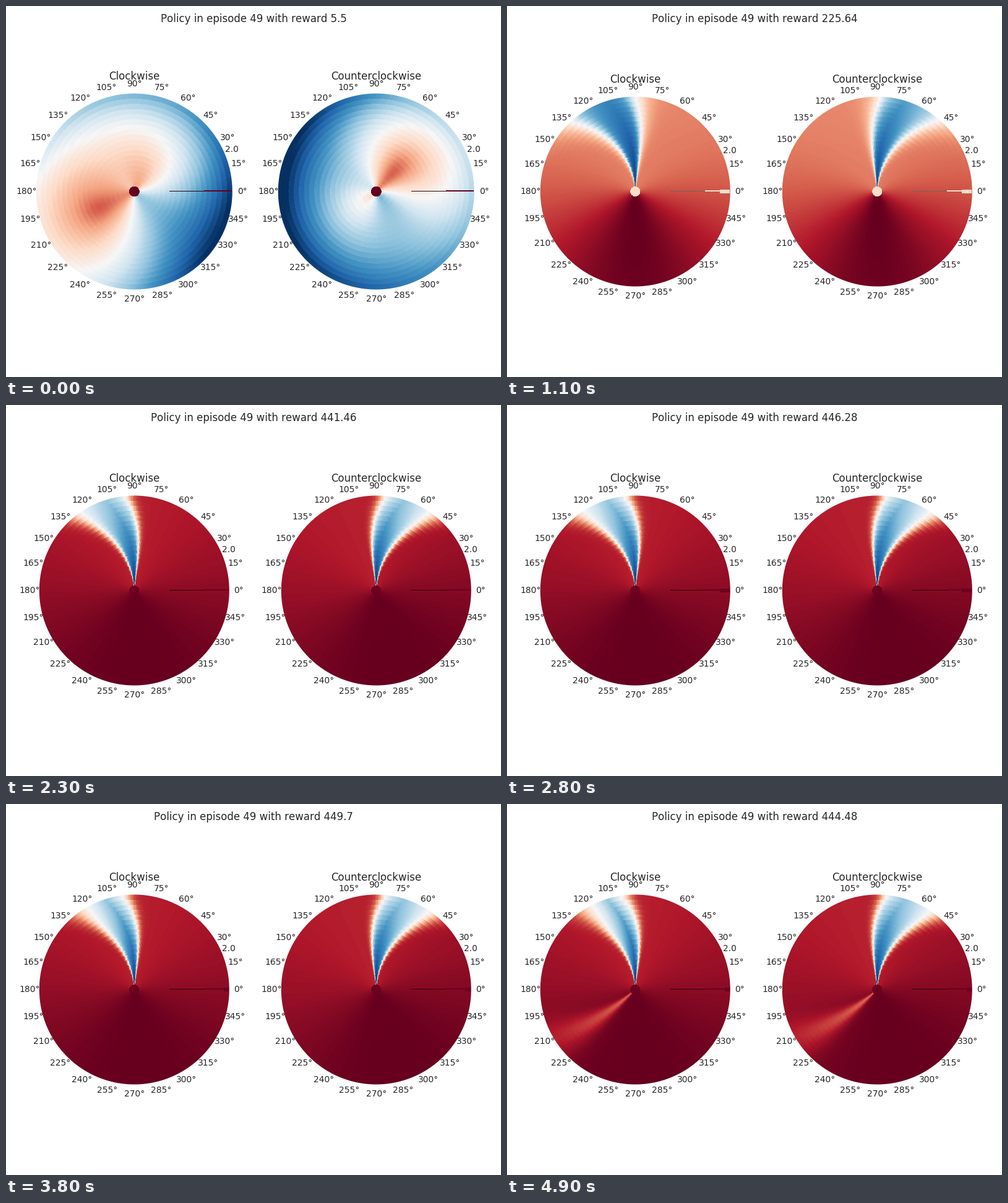
A matplotlib script that plays this animation: 800 px wide and 600 px high, repeating every 5 s.

```python
import numpy as np
import matplotlib
import matplotlib.pyplot as plt
from matplotlib.animation import FuncAnimation

W, H, DPI = 800, 600, 100
FRAMES, INTERVAL = 50, 100
RINGS, SECTORS = 19, 360
EARLY, TRAINED = 6, 17  # frames at which learning reaches each stage
CENTERS = ((207.3, 300), (598.3, 300))
SIDES = (1, -1)  # the wedge bends left on the first disc, right on the second
INK = "#262626"
CMAP = matplotlib.colormaps["RdBu"]
plt.rcParams["font.family"] = "DejaVu Sans"
plt.rcParams["text.kerning_factor"] = 6

RHO = np.linspace(0, 1, RINGS)[:, None]
THETA = (np.arange(SECTORS) + 0.5)[None, :]
ANGLE = np.radians(THETA)

# Reward and width of the seam's rim (in rings) over time
KEYS = (0, 6, 17, 23, 33, 42, 49)
REWARDS = (5.5, 26.36, 464.78, 441.46, 451.1, 448.58, 444.48)
RIMS = (0, 2, 2, 0, 3, 0, 1)


def sigmoid(x):
    return 1 / (1 + np.exp(-np.clip(x, -50, 50)))


def bump(x, center, width):
    return np.exp(-((x - center) / width) ** 2)


def ramp(x, start, stop):
    return float(np.clip((x - start) / (stop - start), 0, 1))


def untrained(inner, middle, outer, hot_angle, hot_rho):
    """Each radius has a mean and weights for cos, sin and sin of twice the angle."""
    waves = (1, np.cos(ANGLE), np.sin(ANGLE), np.sin(2 * ANGLE))
    a, b, c = (sum(k * w for k, w in zip(ks, waves)) for ks in (inner, middle, outer))
    smooth = (a * (1 - RHO) * (1 - 2 * RHO) + 4 * b * RHO * (1 - RHO)
              + c * RHO * (2 * RHO - 1))
    return smooth - 0.08 * bump(THETA, hot_angle, 18) * bump(RHO, hot_rho, 0.2)


def add_wedge(base, side, near_end, far_end, peak, drop, soft):
    """Blend in a blue wedge that starts upright and bends away with radius."""
    offset = side * ((THETA - 90 + 180) % 360 - 180)
    near = -5 - 9 * RHO + (near_end + 14) * RHO ** 2
    far = 4 + (far_end - 4) * RHO ** 1.1
    across = np.clip((offset - near) / (far - near), 0, 1)
    top = 1 - (1 - peak) * RHO - drop * RHO * np.abs(across - 0.38)
    mask = (sigmoid((offset - near) / (soft * (0.8 + RHO)))
            * sigmoid((far - offset) / (soft * (0.8 + 1.8 * RHO))))
    return base + (top - base) * mask


def early(side):
    base = 0.22 + 0.18 * np.sin(ANGLE) + 0.05 * np.cos(2 * ANGLE) + 0.03 * RHO
    peak = 0.92 + 0.05 * side
    return add_wedge(base, side, -3 - side, 45, peak, 0.1, 2.4)


def trained(side, frame):
    progress = ramp(frame, TRAINED, FRAMES - 1)
    dark = np.radians(280 - 5 * side)
    base = 0.055 * (1 - np.cos(ANGLE - dark))
    base = base + (0.2 * ramp(frame, 42, 49) * (1 - 0.6 * RHO)
                   * bump(THETA, 223 - 11 * RHO, 7 + 5 * RHO))
    drop = 0.25 + 0.5 * progress if side > 0 else 0.35
    return add_wedge(base, side, 3, 40, 0.7, drop, 1.1)


START = np.array([
    untrained((.42, .12, -.10, -.10), (.50, .19, -.07, -.09), (.72, .25, 0, -.09), 205, .4),
    untrained((.50, .02, -.10, -.15), (.59, -.13, -.10, -.09), (.84, -.20, -.05, -.04), 48, .27),
])


def policy(frame):
    first = np.array([early(s) for s in SIDES])
    if frame <= EARLY:
        stage, following, u = START, first, frame / EARLY
    else:
        stage = first
        following = np.array([trained(s, frame) for s in SIDES])
        u = ramp(frame, EARLY, TRAINED)
    return np.clip(stage * (1 - u) + following * u, 0, 1)


YY, XX = np.mgrid[0:H, 0:W] + 0.5


def polar(cx, cy, radius):
    dx, dy = XX - cx, cy - YY
    dist = np.hypot(dx, dy)
    ring = np.minimum((dist / radius * RINGS).astype(int), RINGS - 1)
    sector = (np.degrees(np.arctan2(dy, dx)) % 360).astype(int) % SECTORS
    return ring, sector, np.clip(radius - dist + 0.5, 0, 1)[..., None]


GRIDS = {r: [polar(*c, r) for c in CENTERS] for r in (158.5, 153.5)}


def paint(picture, center, grid, values, hub, radius, rim):
    ring, sector, cover = grid
    values[0] = hub
    colors = CMAP(values)[..., :3][ring, sector]
    picture[:] = picture * (1 - cover) + colors * cover

    # The seam at 0 degrees thickens towards the rim.
    x, y = int(center[0]), center[1]
    edge = x + int(radius)
    tone = np.array(CMAP(hub)[:3])
    picture[y - 1, x + 57:x + 113] = tone * 0.45
    picture[y - 2:y, x + 113:edge] = tone
    if rim:
        picture[y - 3:y + 3, edge - round(rim * radius / RINGS):edge] = tone


fig = plt.figure(figsize=(W / DPI, H / DPI), dpi=DPI, facecolor="white")
ax = fig.add_axes((0, 0, 1, 1))
image = ax.imshow(np.ones((H, W, 3)), extent=(0, W, H, 0), interpolation="nearest")
ax.set(xlim=(0, W), ylim=(H, 0))
ax.set_axis_off()


def label(text, size=10, ha="center", va="center"):
    return ax.text(0, 0, text, size=size, color=INK, ha=ha, va=va)


headline = label("", 12, va="top")
headline.set_position((W / 2, 12))
titles = [label(t, 12, va="baseline") for t in ("Clockwise", "Counterclockwise")]
ticks = [[(a, label(f"{a}°")) for a in range(0, 360, 15)] for _ in CENTERS]
radials = [label("2.0", ha="left", va="bottom") for _ in CENTERS]


def place_labels(radius):
    for (cx, cy), title, marks, radial in zip(CENTERS, titles, ticks, radials):
        def at(angle, r):
            a = np.radians(angle)
            return cx + r * np.cos(a), cy - r * np.sin(a)

        title.set_position((cx, cy - 1.1 * radius - 6.94))
        radial.set_position(at(22.5, radius))
        for angle, mark in marks:
            mark.set_position(at(angle, 1.1 * radius))


def update(frame):
    radius = 153.5 if frame else 158.5
    hub = np.interp(frame, (0, EARLY, TRAINED), (0, 0.75, 0.01))
    rim = round(np.interp(frame, KEYS, RIMS))
    reward = round(float(np.interp(frame, KEYS, REWARDS)), 2)

    picture = np.ones((H, W, 3))
    for center, grid, values in zip(CENTERS, GRIDS[radius], policy(frame)):
        paint(picture, center, grid, values, hub, radius, rim)
    image.set_data(picture)
    headline.set_text(f"Policy in episode 49 with reward {reward}")
    place_labels(radius)
    return [image, headline]


anim = FuncAnimation(fig, update, frames=FRAMES, interval=INTERVAL,
                     repeat=True, repeat_delay=0, blit=False)
plt.show()
```
